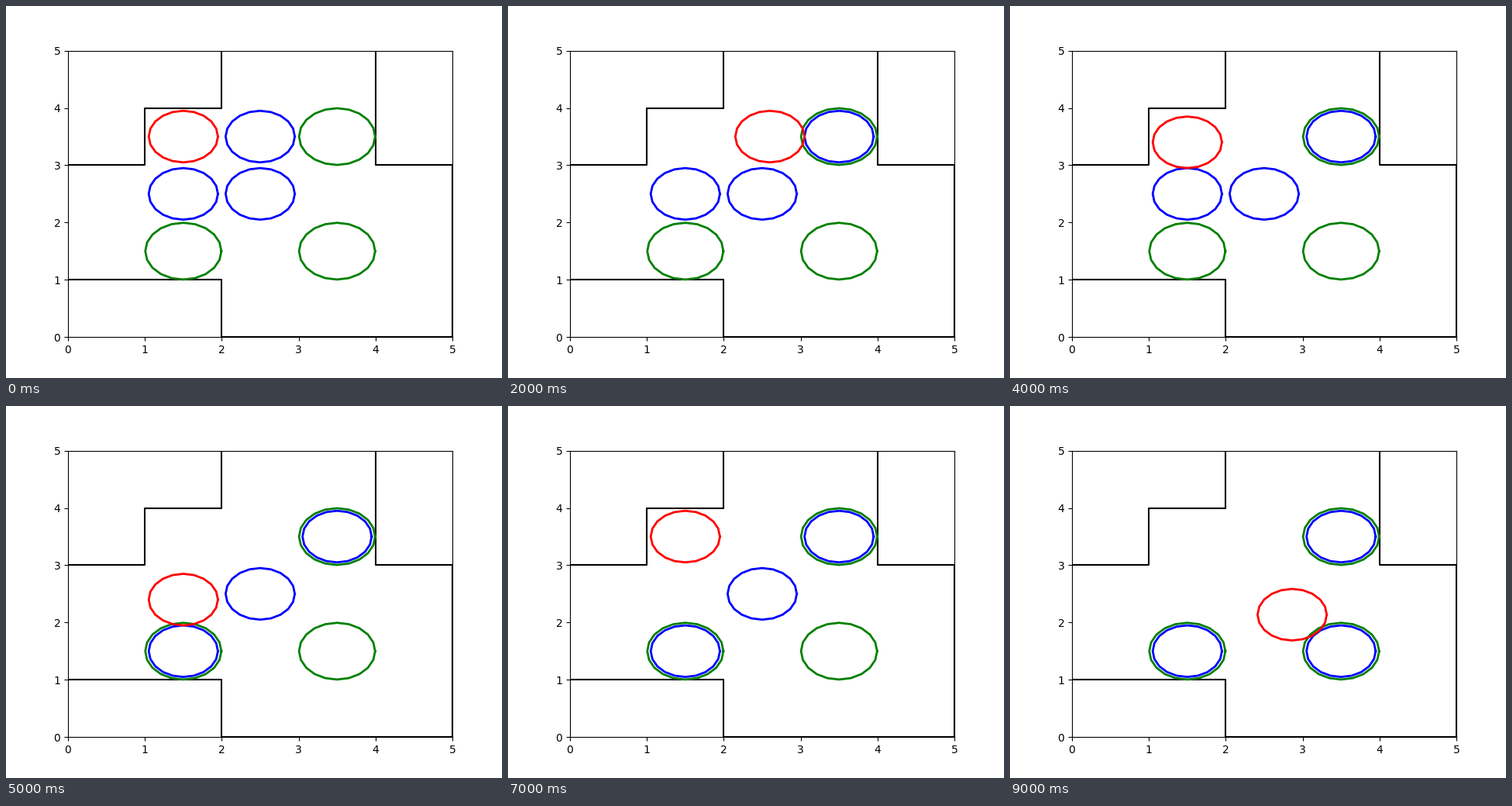
A matplotlib script for the animation above (10 s loop, 640 by 480 pixels).

```python
import numpy as np
import matplotlib.pyplot as plt
from matplotlib.animation import FuncAnimation

STEP_MS = 1000
BODY_R, GOAL_R = 0.45, 0.495
GAP = 2 * BODY_R            # centre distance at contact
DIAG = GAP / np.sqrt(2)

WALLS = [
    [(0, 3), (1, 3), (1, 4), (2, 4), (2, 5)],
    [(0, 1), (2, 1), (2, 0), (5, 0), (5, 3), (4, 3), (4, 5)],
]
GOALS = [(1.5, 1.5), (3.5, 1.5), (3.5, 3.5)]

# The robot touches a disc, pushes it one cell, then backs off.
ROBOT = [
    (1.5, 3.5),
    (2.5 - GAP, 3.5),
    (3.5 - GAP, 3.5),
    (2.5, 3.5),
    (1.5, 2.5 + GAP),
    (1.5, 1.5 + GAP),
    (1.5, 2.5),
    (1.5, 3.5),
    (2.5 - DIAG, 2.5 + DIAG),
    (3.5 - DIAG, 1.5 + DIAG),
]

# start, end, step at which the push is complete
DISCS = [
    ((2.5, 3.5), (3.5, 3.5), 2),
    ((1.5, 2.5), (1.5, 1.5), 5),
    ((2.5, 2.5), (3.5, 1.5), 9),
]

ANGLES = np.linspace(0, 2 * np.pi, 21)


def ring(center, radius):
    x, y = center
    return x + radius * np.cos(ANGLES), y + radius * np.sin(ANGLES)


fig, ax = plt.subplots(figsize=(6.4, 4.8), dpi=100)
ax.set_xlim(0, 5)
ax.set_ylim(0, 5)

for wall in WALLS:
    ax.plot(*zip(*wall), color="black", lw=1.5)
for goal in GOALS:
    ax.plot(*ring(goal, GOAL_R), color="green", lw=2)
disc_lines = [ax.plot([], [], color="blue", lw=2)[0] for _ in DISCS]
robot_line, = ax.plot([], [], color="red", lw=2)


def update(step):
    for line, (start, end, done) in zip(disc_lines, DISCS):
        line.set_data(*ring(end if step >= done else start, BODY_R))
    robot_line.set_data(*ring(ROBOT[step], BODY_R))
    return [*disc_lines, robot_line]


anim = FuncAnimation(fig, update, frames=len(ROBOT), init_func=lambda: update(0),
                     interval=STEP_MS, repeat=True, repeat_delay=0)
plt.show()
```
